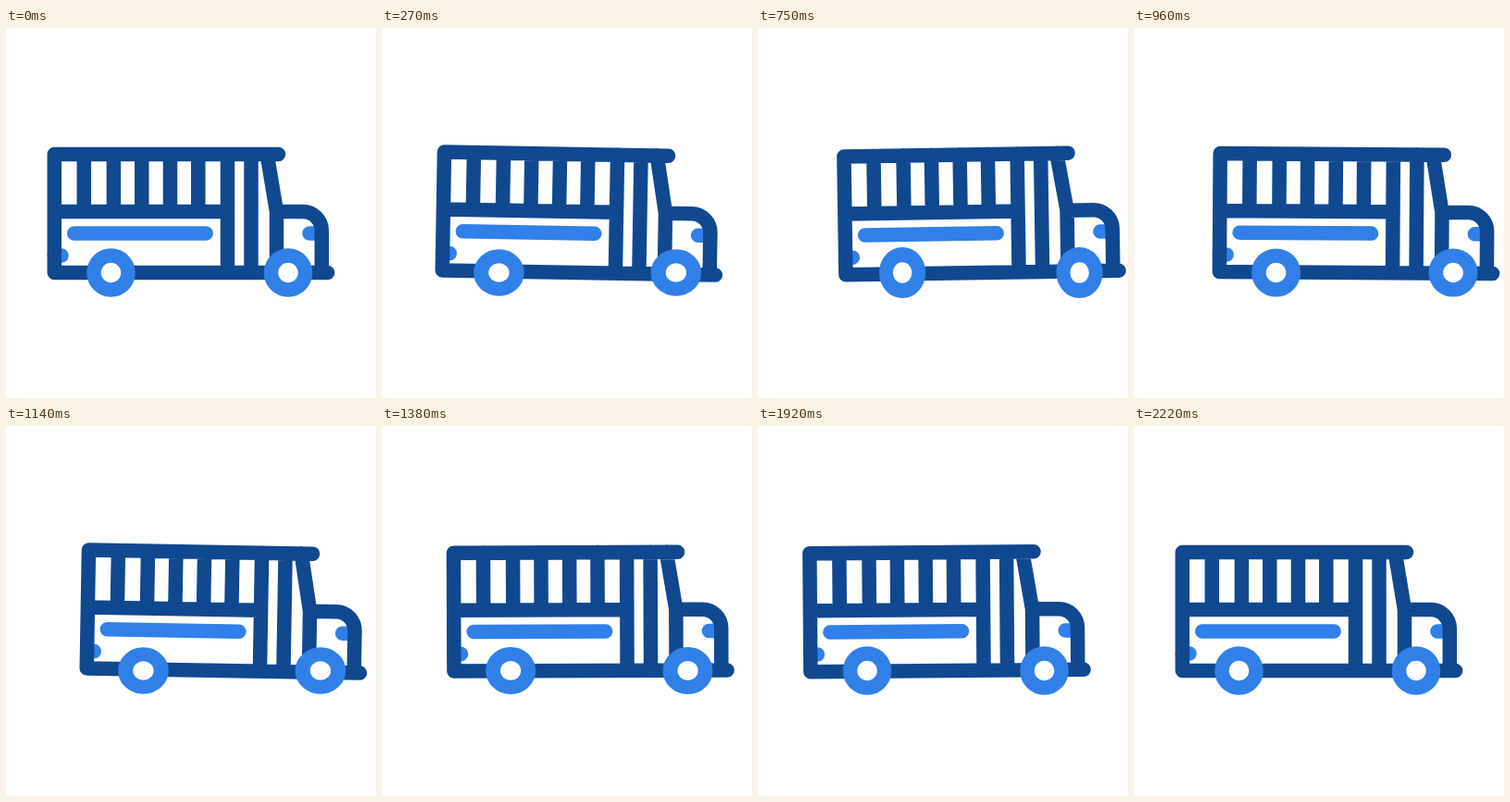
These frames come from a looping animation (400x400 px, 2520 ms). An HTML page:

```html
<!DOCTYPE html>
<html lang="en">
<head>
<meta charset="utf-8">
<title>Bus</title>
<style>
  html, body { margin: 0; width: 100%; height: 100%; overflow: hidden; background: #fff; }
  svg { display: block; width: 100%; height: 100%; }
  path, circle { stroke-width: 15.5; stroke-linecap: round; stroke-linejoin: round; }
  path { fill: none; }
  circle { fill: #fff; }
  .dark { stroke: #104890; }
  .light { stroke: #3080e8; }
</style>
</head>
<body>
<svg viewBox="0 0 400 400">
  <g id="body">
    <path class="light" d="M73.7 222H216.2M52.3 246H60M328 222H341"/>
    <path class="dark" d="M294.5 136.6H52.3V264.5H347.6M52.3 198.6H239.5
      M84.3 136.6V198.6M116.4 136.6V198.6M146.8 136.6V198.6M177.5 136.6V198.6M207.8 136.6V198.6
      M239.5 136.6V264.5M265 136.6V264.5M282.2 136.6L292.5 198.6V264.5
      M292.5 198.6H321A20.3 20.3 0 0 1 341.3 218.9V264.5"/>
  </g>
  <g class="light">
    <circle class="wheel" r="18.5"/>
    <circle class="wheel" r="18.5"/>
  </g>
</svg>
<script>
const LOOP = 2520, END = 2220, STEP = 30, AXLE = 264.5;
const wheelX = [113.5, 305];

// Keys are [time, value] pairs
const shift = [[0, 0], [740, 42.6], [END, 0]];
const tilt = [[0, 0], [290, 1], [710, -0.95], [1110, 1], [1580, -1], [END, 0]];
const squash = [[0, 0], [300, 0.04], [740, -0.045], [1110, 0.04], [1850, 0]];

const bus = document.getElementById('body');
const wheels = document.querySelectorAll('.wheel');

function at(keys, t) {
  for (let i = 1; i < keys.length; i++) {
    const [t0, a] = keys[i - 1], [t1, b] = keys[i];
    if (t <= t1) {
      const u = (t - t0) / (t1 - t0);
      return a + (b - a) * u * u * (3 - 2 * u);
    }
  }
  return keys[keys.length - 1][1];
}

function draw(ms) {
  const t = Math.min(END, Math.floor((ms % LOOP) / STEP) * STEP);
  const x = at(shift, t), s = at(squash, t);
  bus.setAttribute('transform', `translate(${x} 0) rotate(${at(tilt, t)} 200 ${AXLE})`);
  wheels.forEach((w, i) =>
    w.setAttribute('transform', `translate(${wheelX[i] + x} ${AXLE}) scale(${1 + s} ${1 - s})`));
}

let start;
function tick(now) {
  start ??= now;
  draw(Math.max(0, now - start));
  requestAnimationFrame(tick);
}
draw(0);
requestAnimationFrame(tick);
</script>
</body>
</html>
```
